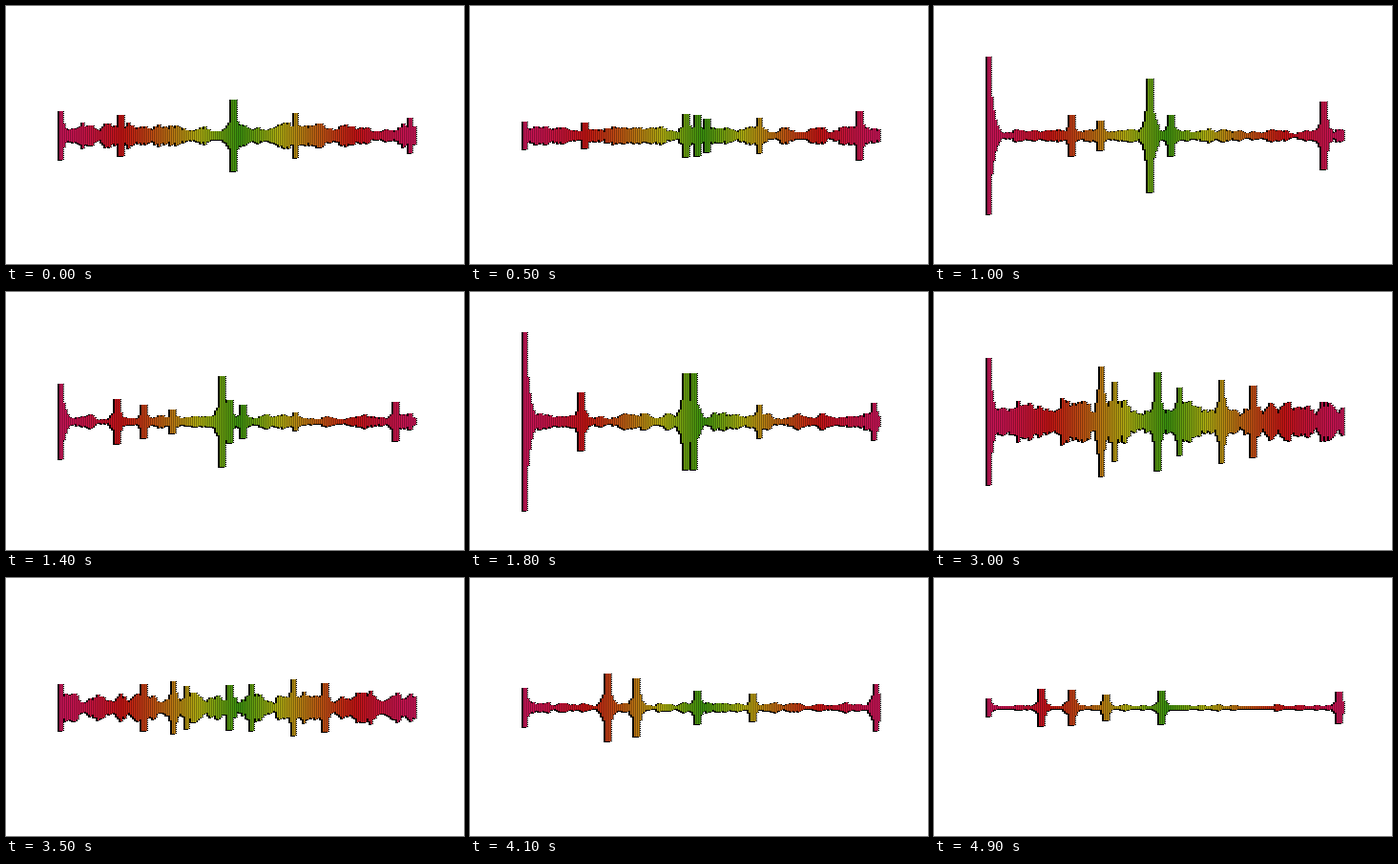
An HTML page with a canvas that plays this animation: 480x270 px, repeating every 5000 ms.

```html
<!DOCTYPE html>
<html lang="en">
<head>
<meta charset="utf-8">
<title>Audio spectrum</title>
<style>
html, body { margin: 0; width: 100%; height: 100%; overflow: hidden; background: #fff; }
canvas { display: block; width: 480px; height: 270px; }
</style>
</head>
<body>
<canvas id="stage" width="480" height="270"></canvas>
<script>
const ctx = document.getElementById('stage').getContext('2d');
const STEP = 100, STEPS = 50;
const LEFT = 56, RIGHT = 429, PITCH = 2, MID = 136;
const CENTER = 243, REACH = 187;

// Main moods of the sound: general loudness and the few loudest tones [x, height]
const moods = [
  { at: 0, hum: 11, tones: [[121, 22], [239, 38], [304, 24], [424, 19]] },
  { at: 10, hum: 6, tones: [[145, 22], [175, 16], [227, 60], [249, 22], [409, 36]] },
  { at: 18, hum: 8, tones: [[117, 31], [227, 51], [235, 51], [304, 18], [424, 20]] },
  { at: 23, hum: 8, tones: [[121, 46], [177, 21], [233, 65], [304, 23], [413, 40]] },
  { at: 30, hum: 20, tones: [[176, 58], [190, 42], [235, 52], [258, 36], [302, 44], [335, 38]] },
  { at: 41, hum: 5, tones: [[145, 36], [175, 31], [239, 18], [297, 15], [426, 25]] },
  { at: 49, hum: 3, tones: [[113, 20], [145, 19], [181, 14], [239, 18], [425, 17]] }
];

// Bass hits: [step, height, decay per step]
const kicks = [[0, 26, 0.9], [8, 121, 0.83], [18, 94, 0.8], [20, 119, 0.79],
  [27, 121, 0.82], [38, 87, 0.62], [44, 110, 0.62]];

const lerp = (a, b, u) => a + (b - a) * u;

function noise(a, b) {
  const n = Math.sin(a * 12.9898 + b * 78.233) * 43758.5453;
  return n - Math.floor(n);
}

function lumps(x, seed) {
  const cell = Math.floor(x / 8), u = x / 8 - cell;
  return lerp(noise(cell, seed), noise(cell + 1, seed), u * u * (3 - 2 * u));
}

// Flat tip, then a steep skirt
function peak(d, flat) {
  return d <= flat ? 1 : 0.62 * Math.exp((flat - d) / 4.5);
}

function mix(step) {
  let i = 0;
  while (i < moods.length - 2 && moods[i + 1].at <= step) i++;
  const a = moods[i], b = moods[i + 1];
  const u = (step - a.at) / (b.at - a.at);
  const loose = Math.min(1, 6 * u * (1 - u));
  const fade = (tones, gain) => tones.map(([x, h]) =>
    [x, h * gain * (1 + loose * (noise(x, step) - 0.3))]);
  return {
    hum: lerp(a.hum, b.hum, u),
    tones: [...fade(a.tones, 1 - u), ...fade(b.tones, u)]
  };
}

function heights(step) {
  const { hum, tones } = mix(step);
  const [hit, power, decay] = kicks.filter(k => k[0] <= step).pop();
  const bass = power * decay ** (step - hit);
  const bars = [];
  for (let x = LEFT; x < RIGHT; x += PITCH) {
    const rough = 0.8 + 0.4 * noise(x, step);
    let h = Math.max(2, hum * (0.35 + 0.8 * lumps(x, step)) * rough);
    h = Math.max(h, bass * peak(x - LEFT, 3));
    for (const [tx, th] of tones) {
      const d = Math.abs(x + 1 - tx);
      h = Math.max(h, th * peak(d, 2) * (d > 2 ? rough : 1));
    }
    bars.push({ x, h: Math.round(h) });
  }
  return bars;
}

// Green in the middle, through orange and red to crimson at both ends
function color(x) {
  const g = Math.max(0, 1 - Math.abs(x - CENTER) / REACH) ** 1.6;
  return `hsl(${-22 + 122 * g}, 82%, ${44 - 12 * g * g}%)`;
}

function draw(step) {
  const bars = heights(step);
  ctx.fillStyle = '#fff';
  ctx.fillRect(0, 0, 480, 270);

  ctx.fillStyle = '#000';
  for (const { x, h } of bars) {
    for (let y = MID - h; y < MID + h; y += 2) ctx.fillRect(x + 2, y, 1, 1);
    ctx.fillRect(x - 2, MID - h, 3, 2 * h);
  }
  for (const { x, h } of bars) {
    ctx.fillStyle = color(x);
    ctx.fillRect(x, MID - h, 2, 2 * h - 1);
    ctx.fillStyle = 'rgba(0,0,0,.35)';
    ctx.fillRect(x + 1, MID - h, 1, 2 * h - 1);
  }
}

let shown = -1;
function tick() {
  const step = Math.floor(performance.now() / STEP) % STEPS;
  if (step !== shown) draw(shown = step);
  requestAnimationFrame(tick);
}
tick();
</script>
</body>
</html>
```
